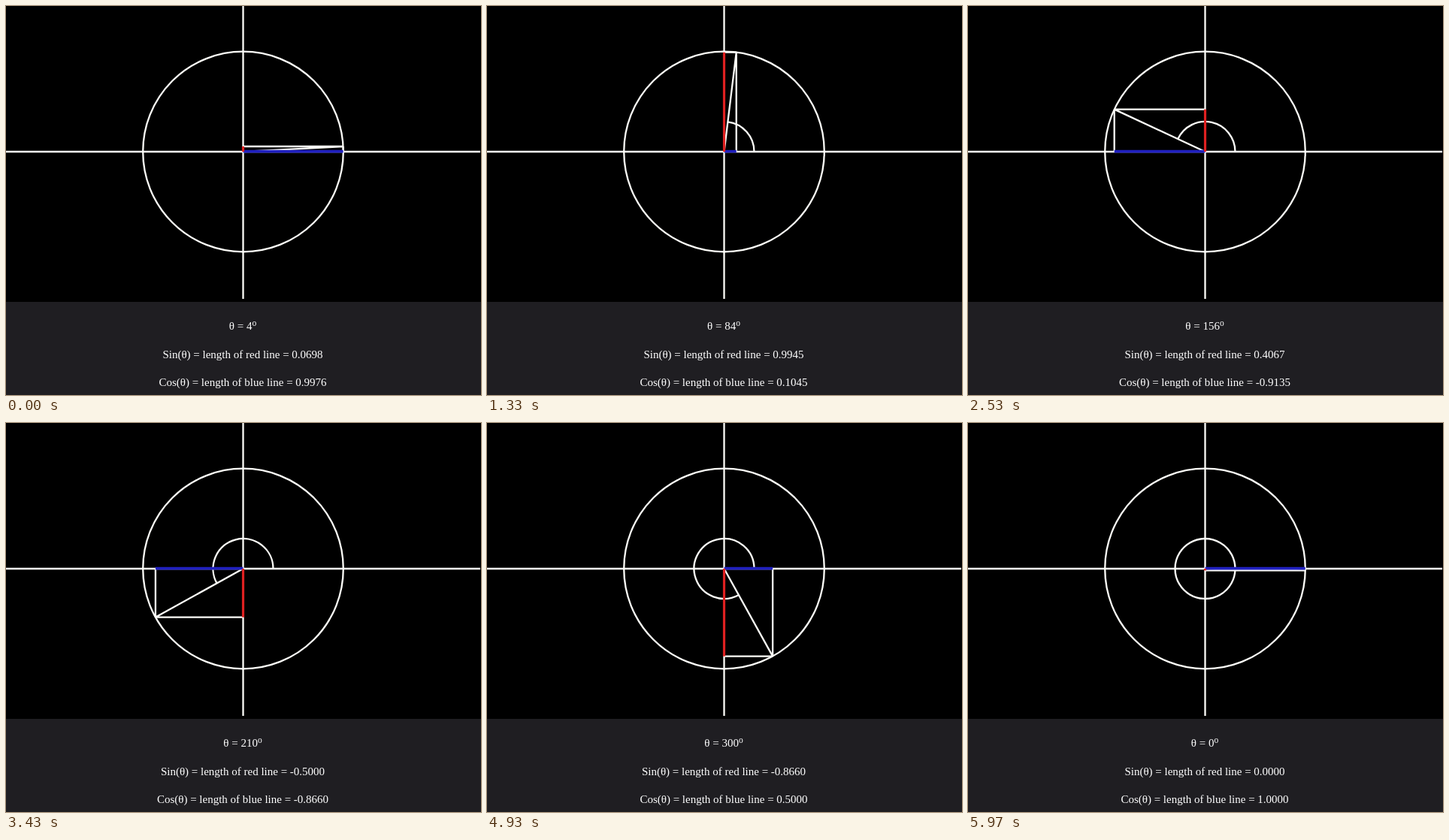
An HTML page that plays this animation: 632x518 px, repeating every 6.01 s.

```html
<!DOCTYPE html>
<html lang="en">
<head>
<meta charset="utf-8">
<title>Sine and cosine on the unit circle</title>
<style>
  html, body { margin: 0; width: 100%; height: 100%; overflow: hidden; background: #000; }
  svg { display: block; }
  .lines { fill: none; stroke: #fcfcf8; stroke-width: 2.3; }
  text { font: 15px "Liberation Serif", "Times New Roman", serif; fill: #fff; text-anchor: middle; }
  .degree { font-size: 11.5px; }
</style>
</head>
<body>
<svg width="632" height="518" viewBox="0 0 632 518">
  <rect width="632" height="518"/>
  <rect y="394" width="632" height="124" fill="#1f1e22"/>
  <g class="lines">
    <path d="M0 194H631M315.5 0V390"/>
    <circle cx="315.5" cy="194" r="133.3"/>
    <path id="arc"/>
    <path id="triangle" stroke-linejoin="bevel"/>
  </g>
  <path id="cosine" stroke="#2020c0" stroke-width="3.6"/>
  <path id="sine" stroke="#e02020" stroke-width="3.2"/>
  <text x="315" y="431">θ = <tspan id="angle"></tspan><tspan class="degree" dy="-5.5">o</tspan></text>
  <text x="315" y="469" id="sineText"></text>
  <text x="315" y="506" id="cosineText"></text>
</svg>
<script>
const LOOP = 6010, LAST = 179;
const CX = 315.5, CY = 194, RADIUS = 133.3, ARC = 40;
const byId = id => document.getElementById(id);
const setPath = (id, d) => byId(id).setAttribute("d", d);
const radians = deg => deg * Math.PI / 180;
const decimals = v => v.toFixed(4).replace("-0.0000", "0.0000");

// Thirty steps a second, on times rounded to 10 ms
function stepAt(ms) {
  const rest = ms % 100;
  return Math.min(LAST, 3 * Math.floor(ms / 100) + (rest >= 30) + (rest >= 70));
}

function draw(step) {
  const theta = step === LAST ? 0 : 4 + 2 * step;
  // The figure trails the readout by one degree
  const shown = (theta + 359) % 360;
  const c = Math.cos(radians(shown)), s = Math.sin(radians(shown));
  const x = CX + RADIUS * c, y = CY - RADIUS * s;

  setPath("triangle", `M${CX} ${CY}L${x} ${y}H${CX}M${x} ${y}V${CY}`);
  setPath("arc", `M${CX + ARC} ${CY}A${ARC} ${ARC} 0 ${+(shown > 180)} 0 ${CX + ARC * c} ${CY - ARC * s}`);
  setPath("cosine", `M${CX} ${CY - 0.4}H${x}`);
  setPath("sine", `M${CX} ${CY}V${y}`);

  byId("angle").textContent = theta;
  byId("sineText").textContent = `Sin(θ) = length of red line = ${decimals(Math.sin(radians(theta)))}`;
  byId("cosineText").textContent = `Cos(θ) = length of blue line = ${decimals(Math.cos(radians(theta)))}`;
}

const start = performance.now();
let current = 0;
function tick() {
  const step = stepAt((performance.now() - start) % LOOP);
  if (step !== current) draw(current = step);
  requestAnimationFrame(tick);
}
draw(current);
requestAnimationFrame(tick);
</script>
</body>
</html>
```
